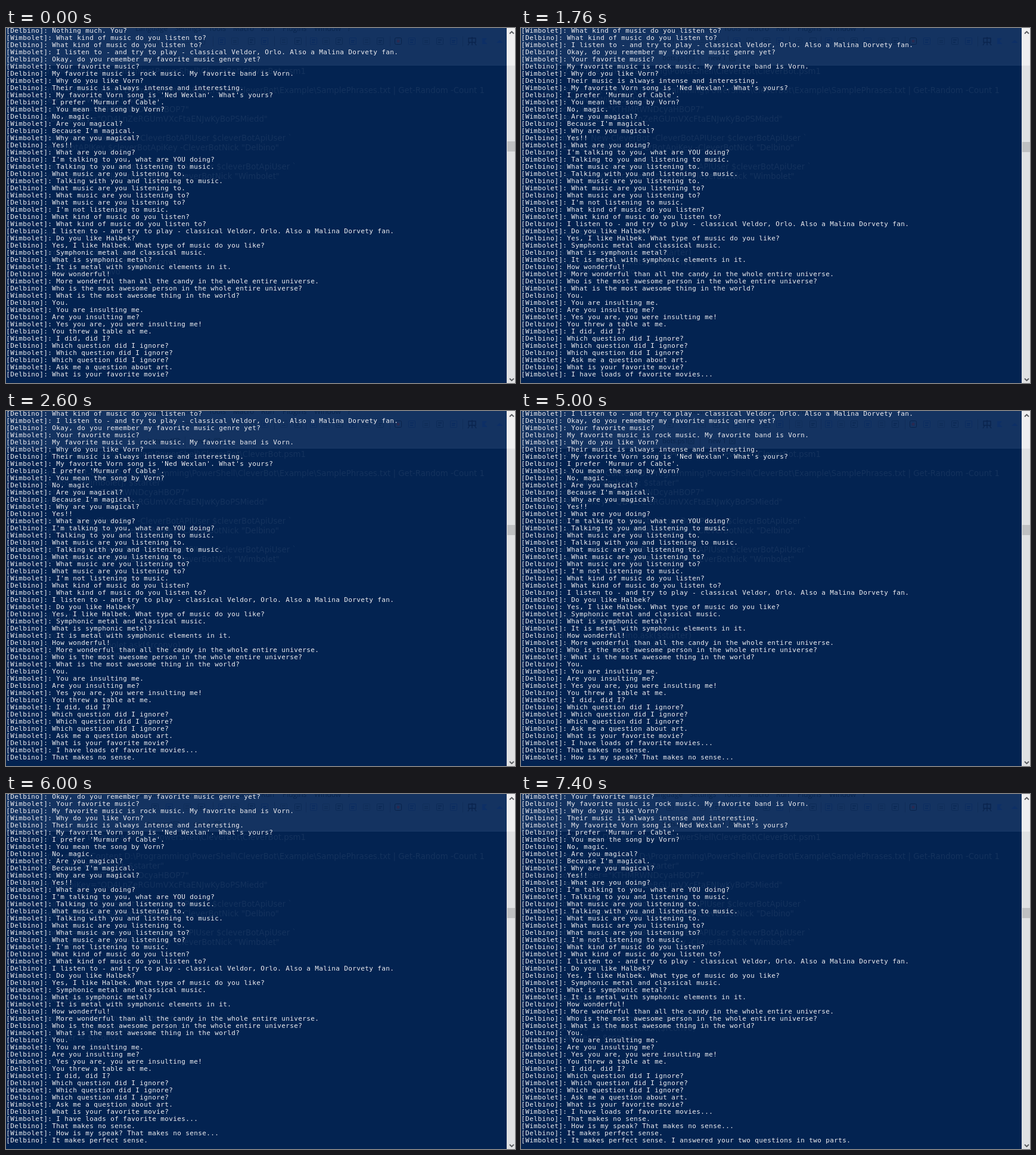
An HTML page that plays this animation: 854 px wide and 595 px high, repeating every 8000 ms.

```html
<!DOCTYPE html>
<html lang="en">
<head>
<meta charset="utf-8">
<title>Bot chat</title>
<style>
  html, body { margin: 0; width: 100%; height: 100%; overflow: hidden; background: #032351; }
  #stage { position: relative; width: 854px; height: 595px; overflow: hidden; background: #032351; }
  svg { position: absolute; left: 0; top: 0; overflow: hidden; }
  #log {
    fill: #f0eff2; font: 11px "DejaVu Sans Mono", monospace;
    letter-spacing: .3775px; font-variant-ligatures: none;
  }
  .code { font: 13.3px "DejaVu Sans", sans-serif; fill: #14325d; white-space: pre; }
  .menu { font: 12px "Open Sans", sans-serif; fill: #09254d; }
  .tab { font: 11px "Open Sans", sans-serif; fill: #09254d; }
</style>
</head>
<body>
<div id="stage">
  <svg id="back" width="854" height="595"></svg>
  <svg width="840" height="586"><g id="log"></g></svg>
  <svg width="854" height="595">
    <rect x="840" width="14" height="595" fill="#e0e1e3"/>
    <rect x="840" width="14" height="63" fill="#efeff0"/>
    <rect id="thumb" x="841" y="190" width="13" height="17" fill="#bfc0c2"/>
    <path d="M845 9.5l3.5-3.5 3.5 3.5M845 587.5l3.5 3.5 3.5-3.5" fill="none" stroke="#55585c" stroke-width="1.8"/>
  </svg>
</div>
<script>
const bots = ["Delbino", "Wimbolet"];
const talk = `Nothing much. You?
What kind of music do you listen to?
What kind of music do you listen to?
I listen to - and try to play - classical Veldor, Orlo. Also a Malina Dorvety fan.
Okay, do you remember my favorite music genre yet?
Your favorite music?
My favorite music is rock music. My favorite band is Vorn.
Why do you like Vorn?
Their music is always intense and interesting.
My favorite Vorn song is 'Ned Wexlan'. What's yours?
I prefer 'Murmur of Cable'.
You mean the song by Vorn?
No, magic.
Are you magical?
Because I'm magical.
Why are you magical?
Yes!!
What are you doing?
I'm talking to you, what are YOU doing?
Talking to you and listening to music.
What music are you listening to.
Talking with you and listening to music.
What music are you listening to.
What music are you listening to?
What music are you listening to?
I'm not listening to music.
What kind of music do you listen?
What kind of music do you listen to?
I listen to - and try to play - classical Veldor, Orlo. Also a Malina Dorvety fan.
Do you like Halbek?
Yes, I like Halbek. What type of music do you like?
Symphonic metal and classical music.
What is symphonic metal?
It is metal with symphonic elements in it.
How wonderful!
More wonderful than all the candy in the whole entire universe.
Who is the most awesome person in the whole entire universe?
What is the most awesome thing in the world?
You.
You are insulting me.
Are you insulting me?
Yes you are, you were insulting me!
You threw a table at me.
I did, did I?
Which question did I ignore?
Which question did I ignore?
Which question did I ignore?
Ask me a question about art.
What is your favorite movie?
I have loads of favorite movies...
That makes no sense.
How is my speak? That makes no sense...
It makes perfect sense.
It makes perfect sense. I answered your two questions in two parts.`.split("\n");

const back = document.getElementById("back");
const log = document.getElementById("log");
const thumb = document.getElementById("thumb");

function add(tag, attrs, text = "", parent = back) {
  const el = document.createElementNS("http://www.w3.org/2000/svg", tag);
  for (const key in attrs) el.setAttribute(key, attrs[key]);
  el.textContent = text;
  parent.append(el);
}
const box = (x, y, width, height, fill) => add("rect", { x, y, width, height, fill });
const label = (cls, x, y, text, anchor = "start") =>
  add("text", { class: cls, x, y, "text-anchor": anchor }, text);

const row = 12;
talk.forEach((line, i) => add("text", { x: 0.2, y: 8 + i * row }, `[${bots[i % 2]}]: ${line}`, log));

// The editor window that shines through the console
box(0, 0, 840, 63, "#143361");
box(0, 62, 840, 1, "#183765");

[[217, "Language"], [283, "Settings"], [340, "Tools"], [381, "Macro"],
 [428, "Run"], [464, "Plugins"], [517, "Window"], [573, "?"]]
  .forEach(([x, text]) => label("menu", x, 5, text));

function icon(x, i) {
  const tone = ["#0c2a56", "#0b2c60", "#102e5a"][i % 3];
  add("rect", { x: x - 5.5, y: 16.5, width: 11, height: 11, rx: 1, fill: "none", stroke: tone });
  box(x - 3, 19 + i % 2, 6, 2, tone);
  box(x - 3, 23, 4 + i % 3, 2, tone);
}
[250, 274, 304, 328, 362, 384, 412, 434, 466, 490, 516, 537, 559, 582, 605, 628, 681, 705, 728, 751]
  .forEach(icon);
[347, 450, 503, 644, 766].forEach(x => box(x, 14, 1, 17, "#0f2d59"));
add("rect", { x: 652.5, y: 16.5, width: 11, height: 11, rx: 2, fill: "none", stroke: "#08224a" });
add("circle", { cx: 658, cy: 22, r: 2.5, fill: "#2a2950" });
add("path", { d: "M776 17h12v7h-12zM778 24l-3 5M786 24l3 5M782 15v14", fill: "none", stroke: "#0a244e", "stroke-width": 1.4 });
add("path", { d: "M799 17h8l-4 5 5 5h-9M823 25l5-5 6 5z", fill: "#0d2f66" });

label("tab", 281, 54, "bots.ps1", "end");
label("tab", 314, 54, "new 1");
[285, 354].forEach(x => add("path", {
  d: `M${x - 4} 46h9v9h-9zm2 2l5 5m0-5l-5 5`, fill: "none", stroke: "#0b2850"
}));
box(300, 43, 1, 19, "#0f2d59");

// Right edge, middle, text
const [a, b] = bots.map(name => name.toLowerCase());
const make = name => `$${name} = New-CleverBot -CleverBotAPIUser $cleverBotApiUser \``;
const nick = name => `-CleverBotAPIKey $cleverBotApiKey -CleverBotNick "${name}"`;
[
  [503, 72, "Import-Module D:\\Programming\\PowerShell\\CleverBot\\CleverBot.psm1"],
  [803, 104, "$starter = Get-Content D:\\Programming\\PowerShell\\CleverBot\\Example\\SamplePhrases.txt | Get-Random -Count 1"],
  [265, 120, `Write-Host "[${bots[1]}]: $starter"`],
  [307, 136, '$cleverBotApiUser="KTHMRWNDcyaHBOP7"'],
  [439, 152, '$cleverBotApiKey="QD4LnZeRGUmVXcFtaENJwKyBoPSMiedd"'],
  [480, 184, make(a)],
  [458, 200, nick(bots[0])],
  [487, 232, make(b)],
  [459, 248, nick(bots[1])],
  [150, 344, "while ($true) {"],
  [286, 376, `$rconvo = $${a}.ask($starter)`],
  [293, 392, `$sconvo = $${b}.ask($rconvo)`],
  [192, 408, "$starter = $sconvo"]
].forEach(([x, y, text]) => label("code", x, y + 5, text, "end"));

// Each new message pushes the log up by one row
const loop = 8000;
const times = [0, 500, 2600, 3500, 6000, 6500, loop];
function play(el, shift) {
  const frames = times.map((t, i) => ({
    offset: t / loop,
    transform: `translateY(${shift(Math.min(i, 5))}px)`,
    easing: "step-end"
  }));
  el.animate(frames, { duration: loop, iterations: Infinity });
}
play(log, i => -row * i);
play(thumb, i => Math.min(i, 1));
</script>
</body>
</html>
```
